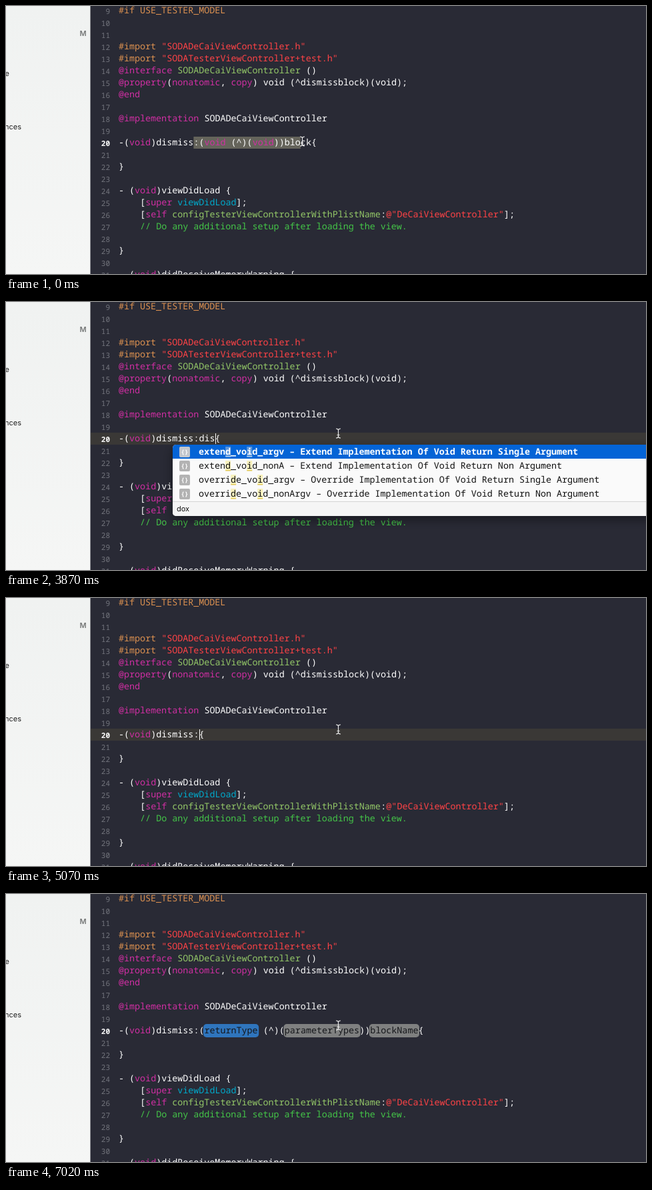
Animation, 960 px wide and 402 px high, one loop 8 s. Source, as an HTML page with a canvas:

```html
<!DOCTYPE html>
<html lang="en">
<head>
<meta charset="utf-8">
<title>Code completion</title>
<style>
  html, body { margin: 0; width: 100%; height: 100%; overflow: hidden; background: #292a35; }
  canvas { display: block; }
</style>
</head>
<body>
<canvas id="stage" width="960" height="402"></canvas>
<script>
const ctx = document.getElementById('stage').getContext('2d');
const LOOP = 8000, CHAR = 8.027, LEFT = 169, LINE = 18, FIRST = 9, ACTIVE = 20;
const MONO = '"Noto Sans Mono", "DejaVu Sans Mono", monospace';
const SANS = 'Inter, "Noto Sans CJK SC", "Noto Sans CJK", sans-serif';
const CODE = `500 13.378px ${MONO}`, CODE_BOLD = `700 13.378px ${MONO}`;

// The first letter of each token picks its colour.
const COLORS = {
  w: '#ffffff', k: '#d02fa3', p: '#dc9150', s: '#ff4346',
  t: '#94c868', m: '#00aacb', c: '#44c548', d: '#15161a'
};
const LINES = {
  9: ['p#if USE_TESTER_MODEL'],
  12: ['p#import ', 's"SODADeCaiViewController.h"'],
  13: ['p#import ', 's"SODATesterViewController+test.h"'],
  14: ['k@interface ', 'tSODADeCaiViewController', 'w ()'],
  15: ['k@property', 'w(', 'knonatomic', 'w, ', 'kcopy', 'w) void (^dismissblock)(void);'],
  16: ['k@end'],
  18: ['k@implementation ', 'wSODADeCaiViewController'],
  22: ['w}'],
  24: ['w- (', 'kvoid', 'w)viewDidLoad {'],
  25: ['w    [', 'ksuper', 'w ', 'mviewDidLoad', 'w];'],
  26: ['w    [', 'kself', 'w ', 'tconfigTesterViewControllerWithPlistName', 'w:',
       's@"DeCaiViewController"', 'w];'],
  27: ['c    // Do any additional setup after loading the view.'],
  29: ['w}'],
  31: ['w- (', 'kvoid', 'w)didReceiveMemoryWarning {']
};
const HEAD = ['w-(', 'kvoid', 'w)dismiss'];
const OLD_ARGUMENT = ['w:(', 'kvoid', 'w (^)(', 'kvoid', 'w))block{'];
const SNIPPET = ['w:(', 'dreturnType', 'w (^)(', 'dparameterTypes', 'w))', 'dblockName', 'w{'];

const describe = (verb, name, kind, arg) =>
  `${verb.toLowerCase()}_${name} – ${verb} Implementation Of ${kind} Return ${arg} Argument`;
const extendArgv = describe('Extend', 'void_argv', 'Void', 'Single');
const extendNon = describe('Extend', 'void_nonA', 'Void', 'Non');
const overrideArgv = describe('Override', 'void_argv', 'Void', 'Single');

const MENUS = {
  dis: {
    width: 740, note: 'dox',
    items: [extendArgv, extendNon, overrideArgv, describe('Override', 'void_nonArgv', 'Void', 'Non')]
  },
  d: {
    width: 740,
    items: ['dox – Comment', 'blocktypedef – typedef block', extendArgv, extendNon,
      describe('Extend', 'return_argv', 'Non Void', 'Single'), overrideArgv,
      describe('Override', 'return_argv', 'Non Void', 'Single'),
      describe('Override', 'return_nonA', 'Non Void', 'Non')]
  },
  block: {
    width: 484, note: '方法参数里的block',
    items: ['blockArguments – define block as method arguments',
      'blockproperty – Property For Block', 'blocktypedef – typedef block']
  }
};

// Editing steps: start time, typed text, caret on, menu, matched letters, menu opacity.
const STEPS = [
  [1340, ':', true],
  [1940, ':', false],
  [2230, '::', true],
  [2380, ':', true],
  [2530, '', true],
  [2980, '', false],
  [3130, ':', true],
  [3720, ':d', true],
  [3870, ':dis', true, 'dis', 'di'],
  [4020, ':dis', true, 'dis', 'di', 0.4],
  [4170, ':dis', true],
  [4470, ':dis', false],
  [4770, ':di', true],
  [4920, ':d', true, 'd', 'd'],
  [5070, ':', true],
  [5370, ':b', true],
  [5520, ':b', true, 'block', 'b'],
  [5670, ':bl', true, 'block', 'b'],
  [5820, ':bl', true, 'block', 'bl'],
  [5970, ':blo', true, 'block', 'bl'],
  [6120, ':blo', true, 'block', 'blo'],
  [6720, ':bloc', true, 'block', 'bloc']
];
const SNIPPET_AT = 7020;

// Pointer and selection: start time, x, y, last selected column.
const POINTER = [
  [0, 444, 203, 34], [150, 449, 203, 35], [300, 453, 203, 36],
  [600, 467, 201, 36], [750, 486, 198, 36], [890, 498, 197, 36]
];

const stepAt = (steps, t) => steps.filter(step => step[0] <= t).pop();
const column = n => LEFT + n * CHAR;
const baseline = n => (n - FIRST) * LINE + 11;

function text(str, x, y, font, color, align = 'left') {
  ctx.font = font;
  ctx.fillStyle = color;
  ctx.textAlign = align;
  ctx.fillText(str, x, y);
}

function rect(x, y, w, h, color, radius = 0) {
  ctx.fillStyle = color;
  ctx.beginPath();
  ctx.roundRect(x, y, w, h, radius);
  ctx.fill();
}

function codeLine(n, tokens) {
  let col = 0;
  for (const token of tokens) {
    const str = token.slice(1);
    const indent = str.length - str.trimStart().length;
    text(str.trimStart(), column(col + indent), baseline(n), CODE, COLORS[token[0]]);
    col += str.length;
  }
}

function sidebar() {
  const shade = ctx.createLinearGradient(0, 0, 0, 402);
  shade.addColorStop(0, '#f0f2f1');
  shade.addColorStop(1, '#f5f6f5');
  rect(0, 0, 126.5, 402, shade);
  text('M', 115.5, 45, `600 11px ${SANS}`, '#747676', 'center');
  text('e', 5, 105, `11px ${SANS}`, '#222', 'right');
  text('nces', 23, 185, `11px ${SANS}`, '#222', 'right');
}

function editor() {
  for (let n = FIRST; n <= 31; n++) {
    const active = n === ACTIVE;
    text(n, 156, baseline(n) + 1, `${active ? 700 : 400} 11px ${MONO}`,
      active ? '#fff' : '#73757d', 'right');
    if (LINES[n]) codeLine(n, LINES[n]);
  }
}

function matchColumns(item, query) {
  let at = -1;
  return [...query].map(letter => at = item.indexOf(letter, at + 1));
}

function menu({ width, note, items }, query, alpha = 1) {
  const x = 250, y = 214, row = 21, textX = 289;
  const height = items.length * row + (note ? 23 : 0);
  ctx.save();
  ctx.globalAlpha = alpha;
  ctx.shadowColor = 'rgba(0,0,0,.4)';
  ctx.shadowBlur = 16;
  ctx.shadowOffsetY = 6;
  rect(x, y, width, height, '#fafafa', 5);
  ctx.shadowColor = 'transparent';
  ctx.clip();
  items.forEach((item, i) => {
    const top = y + i * row, selected = i === 0;
    if (selected) rect(x, top, width, row, '#0464d6');
    rect(260, top + 3, 16, 16, selected ? '#c3c7cd' : '#b3b3b3', 2);
    text('{}', 268, top + 14, `700 9px ${MONO}`, '#fff', 'center');
    for (const col of matchColumns(item, query)) {
      const left = textX + col * CHAR;
      rect(left, top + 3, CHAR, 15, selected ? '#5b96dd' : '#f8f1bd');
      rect(left, top + 17, CHAR, 1.5, selected ? '#b5cfee' : '#e5cb57');
    }
    text(item, textX, top + 15, selected ? CODE_BOLD : CODE, selected ? '#fff' : '#111');
  });
  if (note) {
    const top = y + items.length * row;
    rect(x, top, width, 23, '#f5f5f5');
    rect(x, top + 1, width, 1, '#d6d6d6');
    text(note, 256, top + 16, `11px ${SANS}`, '#111');
  }
  ctx.restore();
}

function placeholder(from, length, color) {
  rect(column(from) - 1.5, 195, length * CHAR + 3, 20, color, 5);
}

function pointer(x, y) {
  ctx.strokeStyle = '#e8e8e8';
  ctx.lineWidth = 1.2;
  ctx.beginPath();
  for (const dir of [-1, 1]) {
    ctx.moveTo(x - 3, y + 7 * dir);
    ctx.quadraticCurveTo(x, y + 7 * dir, x + 0.5, y + 5 * dir);
    ctx.quadraticCurveTo(x + 1, y + 7 * dir, x + 4, y + 7 * dir);
  }
  ctx.moveTo(x + 0.5, y - 5);
  ctx.lineTo(x + 0.5, y + 5);
  ctx.moveTo(x - 1.5, y + 2.5);
  ctx.lineTo(x + 2.5, y + 2.5);
  ctx.stroke();
}

function draw(t) {
  const [, mouseX, mouseY, selectedTo] = stepAt(POINTER, t);
  const step = t < SNIPPET_AT ? stepAt(STEPS, t) : null;
  rect(0, 0, 960, 402, '#292a35');
  if (step) rect(127, 196, 833, LINE, '#3a3836');
  sidebar();
  editor();

  if (step) {
    const [, typed, caret, menuName, query, alpha] = step;
    codeLine(ACTIVE, [...HEAD, `w${typed}{`]);
    if (caret) rect(Math.ceil(column(14 + typed.length)), 197, 1, 16, '#fff');
    if (menuName) menu(MENUS[menuName], query, alpha);
  } else if (t < SNIPPET_AT) {
    rect(column(14), 196, (selectedTo - 14) * CHAR, LINE, '#65645b');
    codeLine(ACTIVE, [...HEAD, ...OLD_ARGUMENT]);
  } else {
    placeholder(16, 10, '#2f75bd');
    placeholder(31, 14, '#7f8080');
    placeholder(47, 9, '#7f8080');
    codeLine(ACTIVE, [...HEAD, ...SNIPPET]);
  }
  pointer(mouseX, mouseY);
}

ctx.textRendering = 'geometricPrecision';
const start = performance.now();
function frame() {
  draw((performance.now() - start) % LOOP);
  requestAnimationFrame(frame);
}
frame();
</script>
</body>
</html>
```
